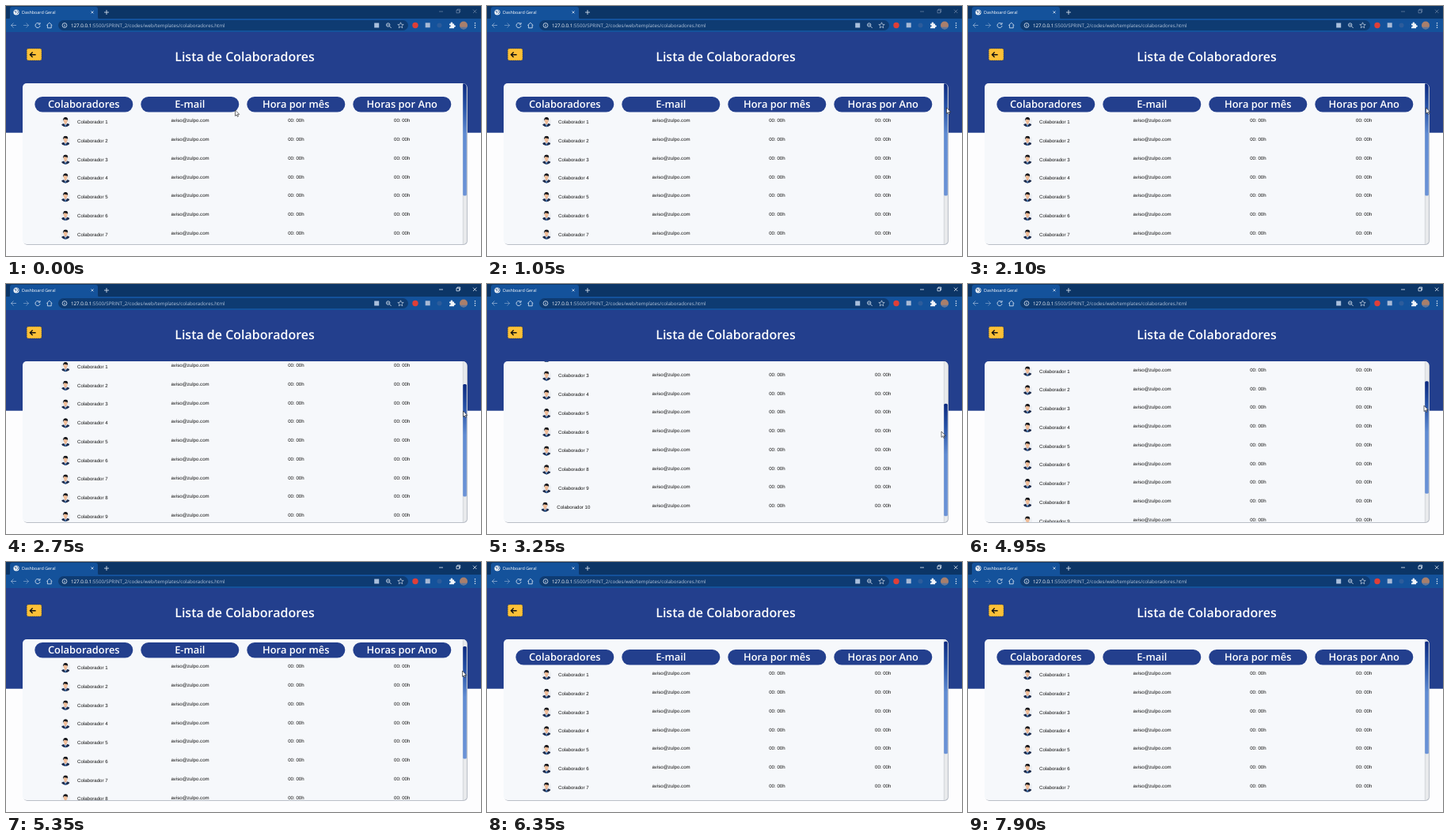
An HTML page that plays this animation: 600x317 px, repeating every 8000 ms.

```html
<!DOCTYPE html>
<html lang="pt">
<head>
<meta charset="utf-8">
<title>Dashboard Geral</title>
<style>
  html, body { margin: 0; width: 100%; height: 100%; overflow: hidden; }
  svg { display: block; width: 600px; height: 317px; }
  text { text-rendering: geometricPrecision; }
  .ui { font-family: "Open Sans", "Noto Sans", sans-serif; fill: #fff; }
  .head { font-weight: 600; font-size: 12.9px; text-anchor: middle; }
  .cell { font: 6.1px "Liberation Sans", Arial, sans-serif; fill: #111; }
  .mid { text-anchor: middle; }
  .line { fill: none; stroke: #e4ecf7; stroke-width: .8; }
</style>
</head>
<body>
<svg viewBox="0 0 600 317">
  <defs>
    <linearGradient id="thumbFill" x2="0" y2="1">
      <stop offset="0" stop-color="#0d2a80"/>
      <stop offset=".2" stop-color="#2450a5"/>
      <stop offset=".45" stop-color="#5f8bd2"/>
      <stop offset="1" stop-color="#6a92d6"/>
    </linearGradient>
    <clipPath id="cardClip"><rect x="21" y="98" width="561" height="204" rx="5"/></clipPath>
    <clipPath id="faceClip"><circle r="6.2"/></clipPath>
    <g id="person" clip-path="url(#faceClip)">
      <circle r="6.2" fill="#eceff3"/>
      <path d="M-6.5 7C-6.5 2.8-3 1.7 0 1.7S6.5 2.8 6.5 7z" fill="#1d2b4c"/>
      <path d="M-2 1.8L0 5.6 2 1.8z" fill="#fff"/>
      <path d="M-.5 3h1l.4 3.4h-1.8z" fill="#356aa8"/>
      <path d="M-1.1 .5h2.2v1.8L0 3.2-1.1 2.3z" fill="#dfa27f"/>
      <ellipse cy="-1.4" rx="2.4" ry="3" fill="#f0bd98"/>
      <path d="M-2.8-1.4C-3.5-4.7-1.8-6 .2-6 2.4-6 3.4-4.3 2.8-1.4L2.2-2.8Q0-2.9-1.5-3.5L-2.3-2.5z" fill="#16171c"/>
    </g>
  </defs>

  <!-- Browser window -->
  <rect width="600" height="317" fill="#fdfdfe"/>
  <rect width="600" height="17" fill="#0c3566"/>
  <path d="M2 17Q5 17 5 14V4Q5 1 8 1H113Q116 1 116 4V14Q116 17 119 17z" fill="#14529b"/>
  <rect y="16" width="600" height="17" fill="#14529b"/>
  <rect x="66" y="18" width="442" height="13" rx="6.5" fill="#0e3b72"/>
  <circle cx="13" cy="8" r="3.6" fill="#edf2f8"/>
  <path d="M10.5 6.4L13 7 12 9.2M14 5.2L15.8 7.8 14 10.2" fill="none" stroke="#335f98" stroke-width=".9"/>
  <text class="ui" x="20" y="10" font-size="5.4">Dashboard Geral</text>
  <text class="ui" x="82" y="26.6" font-size="6.2">127.0.0.1<tspan fill="#b4c5dc">:5500/SPRINT_2/codes/web/templates/colaboradores.html</tspan></text>
  <g class="line">
    <path d="M107.5 6.4l3 3m0-3l-3 3M124 8h6m-3-3v6"/>
    <path d="M13 24.5H6.5m3-3l-3 3 3 3" opacity=".6"/>
    <path d="M22 24.5h6.5m-3-3l3 3-3 3" opacity=".45"/>
    <path d="M42.3 22.6A3 3 0 1 0 43 25M43 21v2.2h-2.3"/>
    <path d="M51.3 24.5l3.5-3.3 3.5 3.3M52.4 24v3.8h4.8V24"/>
    <circle cx="74" cy="24.5" r="2.9"/>
    <path d="M74 24v2.2m0-3.3v.5"/>
    <circle cx="482.7" cy="24" r="2.2"/>
    <path d="M484.4 25.7l2.2 2.2M481.7 24h2"/>
    <path d="M498.5 20.8l1 2.5 2.7.2-2.1 1.7.7 2.6-2.3-1.4-2.3 1.4.7-2.6-2.1-1.7 2.7-.2z" stroke-width=".6"/>
  </g>
  <rect x="465.2" y="21.5" width="6" height="6" fill="#a9bfdc"/>
  <circle cx="517" cy="24.5" r="3.7" fill="#df3f38"/>
  <rect x="529.7" y="21.3" width="6" height="6" fill="#a8b9d5"/>
  <circle cx="547.5" cy="24.5" r="3" fill="#2d5c9b"/>
  <path d="M560 22.5h1.8a1.3 1.3 0 1 1 2.2 0H566v2a1.2 1.2 0 1 1 0 2v1.7h-6v-2a1.1 1.1 0 1 0 0-1.8z" fill="#f1f5fa"/>
  <circle cx="578" cy="24.5" r="5" fill="#a87f6c"/>
  <path d="M573.5 26.7h9a5 5 0 0 1-9 0z" fill="#60779b"/>
  <g fill="#eef3f9">
    <circle cx="592.5" cy="21.7" r=".75"/><circle cx="592.5" cy="24.5" r=".75"/><circle cx="592.5" cy="27.3" r=".75"/>
  </g>
  <path id="controls" class="line" d="M547 7h5M569 5.2h3.6v3.6H569zM570 5.2V4.1h3.7v3.6h-1M590 4.6l4.4 4.4m0-4.4L590 9"/>

  <!-- Page header -->
  <rect y="33" width="600" height="127.7" fill="#233f8d"/>
  <text class="ui head" x="301.5" y="70.4" style="font-size:16px">Lista de Colaboradores</text>
  <rect x="26.2" y="54" width="18.8" height="15" rx="2" fill="#fcc138" stroke="#4c431f" stroke-width=".6" stroke-dasharray="1.5 1"/>
  <path d="M37.6 61.7h-7m3-3.2l-3.2 3.2 3.2 3.2" fill="none" stroke="#111" stroke-width="1.4"/>

  <!-- Scrolling card -->
  <rect x="22" y="99" width="561" height="204" rx="5" fill="#b9bec7"/>
  <rect x="21" y="98" width="561" height="204" rx="5" fill="#f6f8fb"/>
  <g clip-path="url(#cardClip)">
    <g id="list"></g>
    <rect x="577" y="98" width="5" height="204" fill="#e8eaec"/>
    <path d="M577.3 98v204" stroke="#c4c8ce" stroke-width=".6"/>
    <rect id="thumb" x="577.2" width="4.6" height="142.5" rx="1.5" fill="url(#thumbFill)"/>
  </g>
  <path id="cursor" d="M0 0V7.4L1.7 5.9 2.8 8.3 4 7.8 2.9 5.4H5.2z" fill="#fff" stroke="#111" stroke-width=".6"/>
</svg>
<script>
const $ = id => document.getElementById(id);
const LOOP = 8000, ROW = 23.75, RATIO = .69;

const text = (x, y, cls, str) => `<text x="${x}" y="${y}" class="${cls}">${str}</text>`;

function buildList() {
  let out = "";
  ["Colaboradores", "E-mail", "Hora por mês", "Horas por Ano"].forEach((name, i) => {
    const x = 36.3 + i * 134;
    out += `<rect x="${x}" y="115" width="124" height="19.5" rx="9.7" fill="#233f8d"/>`
         + text(x + 62, 128.8, "ui head", name);
  });
  for (let i = 0; i < 10; i++) {
    const y = 147 + i * ROW, shift = i === 9 ? -1.7 : 0;
    out += `<use href="#person" x="${75.2 + shift}" y="${y}"/>`
         + text(90 + shift, y + 2, "cell", "Colaborador " + (i + 1))
         + text(232.5, y + .3, "cell mid", "aviso@zulpo.com")
         + text(366.4, y + .3, "cell mid", "00: 00h")
         + text(500.2, y + .3, "cell mid", "00: 00h");
  }
  $("list").innerHTML = out;
}

// Keys are [time, value, ...]; values are interpolated linearly.
const scrollKeys = [[2300, 0], [2750, 42], [3250, 78], [3500, 84], [4050, 82],
                    [4550, 60], [5350, 13], [5850, 4]];
const pointerKeys = [[0, 289.5, 132], [100, 292, 132], [800, 577, 130], [1300, 584, 128],
                     [1700, 583, 129], [2100, 578.5, 129], [2300, 578, 132],
                     [2750, 577.5, 161], [3250, 574, 187], [4000, 574, 187],
                     [4550, 575.5, 170.5], [5350, 576.5, 138], [5850, 577, 132]];

function sample(keys, t) {
  const i = keys.findIndex(k => k[0] > t);
  if (i < 1) return (i ? keys.at(-1) : keys[0]).slice(1);
  const a = keys[i - 1], b = keys[i], p = (t - a[0]) / (b[0] - a[0]);
  return a.slice(1).map((v, n) => v + (b[n + 1] - v) * p);
}

function draw(now) {
  const t = (now - start) % LOOP;
  const [scroll] = sample(scrollKeys, t);
  const [x, y] = sample(pointerKeys, t);
  $("list").setAttribute("transform", `translate(0 ${-scroll})`);
  $("thumb").setAttribute("y", 98 + scroll * RATIO);
  $("cursor").setAttribute("transform", `translate(${x} ${y})`);
  $("cursor").style.display = t < 5900 ? "" : "none";
  $("controls").style.opacity = t < 2250 ? .4 : 1;
}

function tick() {
  draw(performance.now());
  requestAnimationFrame(tick);
}

buildList();
const start = performance.now();
tick();
</script>
</body>
</html>
```
